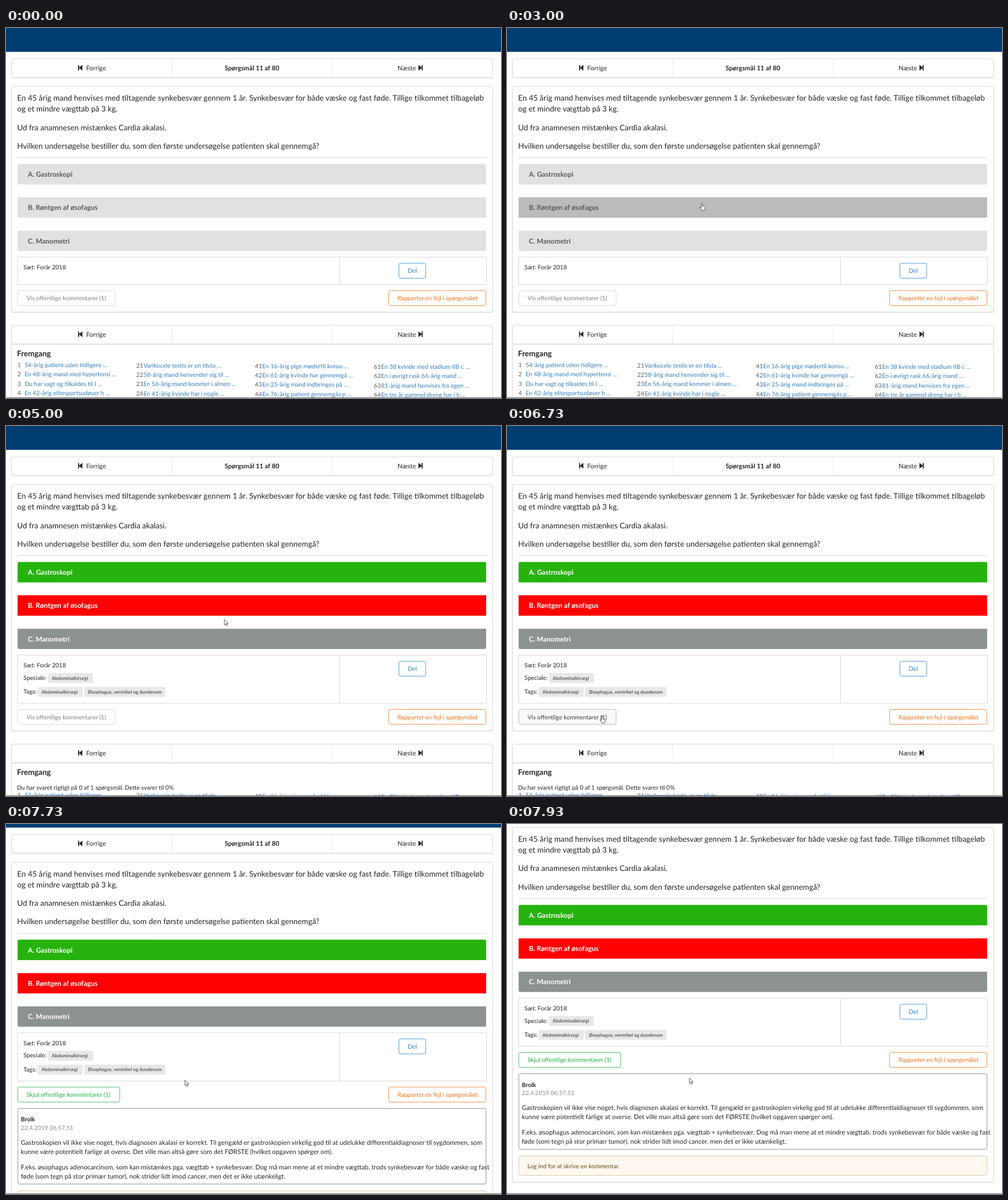
Write an HTML page that moves like this. It is 866 by 647 pixels and loops after 8 s.

```html
<!DOCTYPE html>
<html lang="da">
<head>
<meta charset="utf-8">
<style>
html, body { margin: 0; width: 100%; height: 100%; overflow: hidden; background: #fff; }
svg { display: block; font-family: Lato, sans-serif; font-size: 10.5px; fill: #262626; stroke-width: .8; text-rendering: geometricPrecision; }
.nav { font-size: 11.25px; }
.question { font-size: 13.5px; }
.answer { font-size: 12px; font-weight: 700; }
.heading { font-size: 13.5px; font-weight: 700; }
.comment { font-size: 11.25px; }
.label { font-size: 8.25px; font-weight: 700; fill: #5d5d5d; }
.bold { font-weight: 700; }
.muted { fill: #8c8c8c; }
.link { fill: #337ebf; }
.number { fill: #5c5c5c; }
</style>
</head>
<body>
<svg id="stage" width="866" height="647" viewBox="0 0 866 647"></svg>
<script>
const stage = document.getElementById('stage');
const BORDER = '#d0d0d1';

// Markup helpers
const text = (x, y, content, cls = '', extra = '') =>
  `<text x="${x}" y="${y}" class="${cls}" ${extra}>${content}</text>`;
const box = (x, y, w, h, { r = 3, fill = '#fff', stroke = 'none', id = '' } = {}) =>
  `<rect id="${id}" x="${x}" y="${y}" width="${w}" height="${h}" rx="${r}" fill="${fill}" stroke="${stroke}"/>`;
const line = (x1, y1, x2, y2, color = BORDER) =>
  `<path d="M${x1} ${y1}L${x2} ${y2}" stroke="${color}" fill="none"/>`;
const card = (y, h, id = 'card' + y) =>
  box(9, y + 1, 843, h, { fill: '#e3e3e4', id: id + 'Shadow' }) +
  box(9.5, y, 842, h, { stroke: BORDER, id });
const button = (x, y, w, caption, color) =>
  box(x, y, w, 26.2, { stroke: color }) + text(x + 15.3, y + 17.1, caption, '', `fill="${color}"`);
const label = (x, y, w, caption) =>
  box(x, y, w, 17.5, { fill: '#e8e8e8' }) + text(x + 6.7, y + 11.6, caption, 'label');

const nav = (y, title) =>
  card(y, 32.5) +
  line(289.5, y + .5, 289.5, y + 32, '#e8e8e9') + line(570.5, y + .5, 570.5, y + 32, '#e8e8e9') +
  `<path d="M126.2 ${y + 10.7}h1.8v4.4l5.6-4.6v10l-5.6-4.6v4.4h-1.8z
    M729 ${y + 10.7}h-1.8v4.4l-5.6-4.6v10l5.6-4.6v4.4h1.8z"/>` +
  text(140.2, y + 19.6, 'Forrige', 'nav') +
  text(430.2, y + 19.6, title, 'nav bold', 'text-anchor="middle"') +
  text(685, y + 19.6, 'Næste', 'nav');

const answers = [
  { y: 237.8, caption: 'A. Gastroskopi', shape: 'M20.3 273.4V240.8q0-3 3-3H837q3 0 3 3v32.6z', final: [38, 179, 14] },
  { y: 296.1, caption: 'B. Røntgen af øsofagus', shape: 'M20.3 296.1H840v35.6H20.3z', final: [255, 0, 0] },
  { y: 354.4, caption: 'C. Manometri', shape: 'M20.3 354.4H840V387q0 3-3 3H23.3q-3 0-3-3z', final: [141, 148, 143] }
];

const columns = [
  { x: 20, linkX: 32.4, y: 592.8, first: 1, rows: ['54-årig patient uden tidligere', 'En 48-årig mand med hypertensi', 'Du har vagt og tilkaldes til I', 'En 42-årig elitesportsudøver h'] },
  { x: 227.8, y: 593.7, first: 21, rows: ['Varikocele testis er en tilsta', '58-årig mand henvender sig til', 'En 56-årig mand kommer i almen', 'En 41-årig kvinde har i nogle'] },
  { x: 435.6, y: 594.6, first: 41, rows: ['En 16-årig pige mødertil konsu', 'En 61-årig kvinde har gennemgå', 'En 25-årig mand indbringes på', 'En 76-årig patient gennemgås p'] },
  { x: 643.6, y: 596, first: 61, rows: ['En 38 kvinde med stadium IIB c', 'En i øvrigt rask 66-årig mand', '81-årig mand henvises fra egen', 'En tre år gammel dreng har i b'] }
];
const progressList = columns.map(c => c.rows.map((row, i) =>
  text(c.x, c.y + i * 16.35,
    `${c.first + i}<tspan class="link" ${c.linkX ? `x="${c.linkX}"` : 'dx=".4"'}>${row} ...</tspan>`, 'number')
).join('')).join('');

stage.innerHTML = `
<g id="page">
  <rect width="866" height="41.7" fill="#003d73"/>
  ${nav(54, 'Spørgsmål 11 af 80')}
  ${card(102.3, 394.5, 'main')}
  ${text(19.6, 127.2, 'En 45 årig mand henvises med tiltagende synkebesvær gennem 1 år. Synkebesvær for både væske og fast føde. Tillige tilkommet tilbageløb', 'question')}
  ${text(19.6, 146.2, 'og et mindre vægttab på 3 kg.', 'question')}
  ${text(19.6, 178.5, 'Ud fra anamnesen mistænkes Cardia akalasi.', 'question')}
  ${text(19.6, 210.9, 'Hvilken undersøgelse bestiller du, som den første undersøgelse patienten skal gennemgå?', 'question')}
  ${line(20.3, 226.5, 840, 226.5)}
  ${answers.map(a => `<g class="answer"><path d="${a.shape}"/>${text(38.3, a.y + 22.3, a.caption)}</g>`).join('')}
  ${box(20.4, 400.5, 820, 48, { r: 0, stroke: BORDER, id: 'info' })}
  <path id="divider" stroke="${BORDER}"/>
  ${text(30.6, 422.3, 'Sæt: Forår 2018')}
  ${button(687.4, 411.3, 46.8, 'Del', '#2185d0')}
  <g id="tags">
    ${text(30.6, 443.8, 'Speciale:')}${label(73.4, 432, 78.6, 'Abdominalkirurgi')}
    ${text(30.6, 468.4, 'Tags:')}${label(55.4, 456.3, 78.6, 'Abdominalkirurgi')}
    ${label(136.6, 456.3, 142.4, 'Øsophagus, ventrikel og duodenum')}
  </g>
  <g id="actions">
    <g id="show">${box(20.7, 459.2, 170.2, 26.2)}${text(36, 476.3, 'Vis offentlige kommentarer (1)')}</g>
    <g id="hide">${button(20.7, 459.2, 178.3, 'Skjul offentlige kommentarer (1)', '#1fb141')}</g>
    ${button(669.4, 459.2, 170.2, 'Rapporter en fejl i spørgsmålet', '#f2711c')}
  </g>
  <g id="progress">
    ${card(552.8, 200)}
    ${nav(520, '')}
    ${text(19.3, 573.9, 'Fremgang', 'heading')}
    <g id="score">${text(19.2, 599.6, 'Du har svaret rigtigt på 0 af 1 spørgsmål. Dette svarer til 0%')}</g>
    <g id="list">${progressList}</g>
  </g>
  <g id="comments">
    ${box(20.8, 532.8, 819, 132.2, { stroke: '#777' })}
    ${text(26.1, 555.8, 'Brolk', 'bold')}
    ${text(26.1, 570.2, '22.4.2019 06.57.51', 'muted')}
    ${text(26.1, 596.2, 'Gastroskopien vil ikke vise noget, hvis diagnosen akalasi er korrekt. Til gengæld er gastroskopien virkelig god til at udelukke differentialdiagnoser til sygdommen, som', 'comment')}
    ${text(26.1, 612.2, 'kunne være potentielt farlige at overse. Det ville man altså gøre som det FØRSTE (hvilket opgaven spørger om).', 'comment')}
    ${text(26.1, 639.3, 'F.eks. øsophagus adenocarcinom, som kan mistænkes pga. vægttab + synkebesvær. Dog må man mene at et mindre vægttab, trods synkebesvær for både væske og fast', 'comment')}
    ${text(26.1, 655.3, 'føde (som tegn på stor primær tumor), nok strider lidt imod cancer, men det er ikke utænkeligt.', 'comment')}
    ${box(20.8, 676.5, 819, 34.2, { fill: '#fff8f0', stroke: '#d0c1a2' })}
    ${text(35.7, 697.8, 'Log ind for at skrive en kommentar.', '', 'fill="#644a1b"')}
  </g>
</g>
<rect y="646" width="866" height="1" fill="#68646c"/>
<g id="cursor" fill="#fff" stroke="#333" stroke-linejoin="round">
  <path id="arrow" d="M0 0V9.4L2.2 7.4 3.8 10.9 5.3 10.2 3.7 6.8H6.8Z"/>
  <path id="hand" d="M-1 1.1q0-1.1 1-1.1t1 1.1V5l3.6.8q1.2.4 1.1 1.8L5 12.3H0L-3 8q-.6-1.4.6-1.3L-1 7.9Z"/>
</g>`;

const el = id => document.getElementById(id);
const bars = [...stage.querySelectorAll('.answer')];
const clamp = v => Math.min(1, Math.max(0, v));
const mix = (a, b, p) => a.map((v, i) => v + (b[i] - v) * p);
const rgb = c => `rgb(${c.map(Math.round)})`;
const show = (id, on) => { el(id).style.display = on ? '' : 'none'; };
const move = (id, x, y) => el(id).setAttribute('transform', `translate(${x} ${y})`);

// Linear interpolation through [time, ...values]
function track(keys, t) {
  const next = keys.findIndex(k => k[0] > t);
  if (next < 0) return keys[keys.length - 1].slice(1);
  if (next === 0) return keys[0].slice(1);
  const a = keys[next - 1], b = keys[next];
  return mix(a.slice(1), b.slice(1), (t - a[0]) / (b[0] - a[0]));
}

const pointerPath = [
  [1400, 847, 418], [1600, 700, 378], [1800, 576, 345], [2000, 460, 318], [2200, 398, 309],
  [2333, 353, 309], [2533, 353, 309], [2667, 341, 306.5], [3933, 341, 306.5],
  [4133, 360, 288], [4267, 385, 281], [4400, 403, 300], [4533, 400, 325], [4667, 382, 338.5],
  [5000, 382, 338.5], [5133, 382, 334], [5200, 382, 334], [5400, 350, 370], [5667, 265, 440],
  [5867, 205, 488], [6067, 177, 506], [6333, 166, 507], [7000, 166, 507],
  [7200, 200, 490], [7400, 262, 465], [7600, 310, 449], [7733, 313, 448], [7933, 319, 444]
];
const scrollPath = [[7667, 0], [7733, 35.3], [7800, 62], [7867, 80], [7933, 96.2]];

const IDLE = [224, 225, 226], HOVER = [202, 203, 205], PRESSED = [186, 187, 188];

function render(t) {
  const revealed = t >= 3195, open = t >= 6860;
  const shift = revealed ? 36.3 : 0;
  const [x, y] = track(pointerPath, t);
  const [scroll] = track(scrollPath, t);
  const fade = start => clamp((t - start) / 100);

  const hoverB = mix(mix(IDLE, HOVER, fade(1896)), PRESSED, fade(2900));
  const hoverC = mix(IDLE, HOVER, fade(1538) - fade(1742));
  const reveal = revealed ? clamp((t - 3160) / 110) : 0;
  [IDLE, hoverB, hoverC].forEach((color, i) => {
    const [bar, caption] = bars[i].children;
    bar.setAttribute('fill', rgb(mix(color, answers[i].final, reveal)));
    caption.setAttribute('fill', rgb(mix([90, 90, 91], [255, 255, 255], reveal)));
  });

  const [frame, caption] = el('show').children;
  const hover = fade(5930), pressed = t >= 6595 && t < 6720;
  frame.setAttribute('fill', pressed ? '#f0f0f0' : rgb(mix([255, 255, 255], [249, 249, 249], hover)));
  frame.setAttribute('stroke', rgb(mix([208, 208, 209], [172, 173, 174], hover)));
  caption.setAttribute('fill', rgb(mix([128, 128, 128], [60, 60, 60], hover)));

  const mainHeight = open ? 620 : 394.5 + shift;
  el('main').setAttribute('height', mainHeight);
  el('mainShadow').setAttribute('height', mainHeight);
  el('info').setAttribute('height', 48 + shift);
  el('divider').setAttribute('d', `M583.5 400.5V${448.5 + shift}`);
  show('tags', revealed);
  show('score', revealed);
  show('show', !open);
  show('hide', open);
  show('comments', open);
  move('actions', 0, shift);
  move('progress', 0, open ? 226 : shift);
  move('list', 0, revealed ? 20 : 0);
  move('page', 0, -scroll);

  const overAnswer = !revealed && x < 840 && answers.some(a => y > a.y && y < a.y + 35.5);
  const overButton = x > 20 && x < (open ? 199 : 191) && y > 495 && y < 522;
  show('cursor', t >= 1395);
  show('hand', overAnswer || overButton);
  show('arrow', !(overAnswer || overButton));
  move('cursor', x, y);
}

function tick() {
  const t = performance.now() % 8000;
  render(Math.floor((t + 5) * .015) / .015);
  requestAnimationFrame(tick);
}
tick();
</script>
</body>
</html>
```
